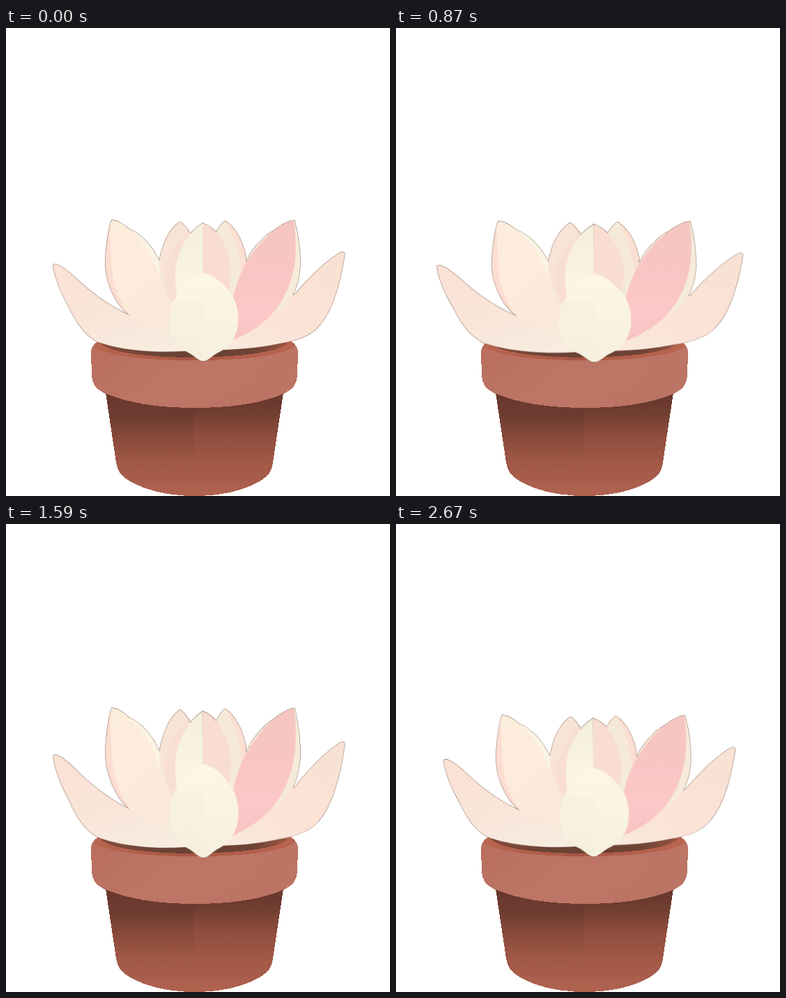
An HTML page without scripts for the animation above (2.7 s loop, 551 px wide and 669 px high).

```html
<!DOCTYPE html>
<html lang="en">
<head>
<meta charset="utf-8">
<title>Potted lotus</title>
<style>
  html, body { margin: 0; width: 100%; height: 100%; overflow: hidden; background: #fff; }
  svg { display: block; width: 551px; height: 669px; }
  .flower { transform-origin: 250px 475px; animation: breathe 2.7s linear infinite; }
  /* widen, settle, stretch upwards, settle */
  @keyframes breathe {
    0%    { transform: translate(0, 0) scale(1, 1); }
    24%   { transform: translate(0, 1.5px) scale(1.0764, 1); }
    47%   { transform: translate(0, 1.6px) scale(1, 1); }
    64.4% { transform: translate(.2px, .5px) scale(1, 1.09); }
    100%  { transform: translate(.8px, -.8px) scale(1, 1); }
  }
</style>
</head>
<body>
<svg viewBox="0 0 551 669" xmlns="http://www.w3.org/2000/svg">
  <defs>
    <linearGradient id="clay" gradientUnits="userSpaceOnUse" x1="0" y1="525" x2="0" y2="669">
      <stop offset="0" stop-color="#6a382d"/>
      <stop offset=".2" stop-color="#6e3b30"/>
      <stop offset=".42" stop-color="#884a3b"/>
      <stop offset=".65" stop-color="#9f5745"/>
      <stop offset="1" stop-color="#b16350"/>
    </linearGradient>
    <linearGradient id="sheen" x2="0" y2="1">
      <stop offset=".1" stop-color="#b0644f" stop-opacity="0"/>
      <stop offset=".45" stop-color="#b0644f" stop-opacity=".2"/>
      <stop offset=".8" stop-color="#b0644f" stop-opacity="0"/>
    </linearGradient>
    <linearGradient id="rim" x2="1" y2=".4">
      <stop offset="0" stop-color="#b96e5d"/>
      <stop offset=".5" stop-color="#bd7565"/>
      <stop offset="1" stop-color="#bc7464"/>
    </linearGradient>
    <linearGradient id="lip">
      <stop offset="0" stop-color="#b9654f"/>
      <stop offset=".45" stop-color="#a95644"/>
      <stop offset="1" stop-color="#b9654f"/>
    </linearGradient>
    <linearGradient id="soil">
      <stop offset="0" stop-color="#8a4a3b"/>
      <stop offset=".3" stop-color="#694335"/>
      <stop offset=".8" stop-color="#6b4234"/>
      <stop offset="1" stop-color="#9d5444"/>
    </linearGradient>
    <linearGradient id="outerLeft" x2=".6" y2="1">
      <stop offset="0" stop-color="#fbe2d5"/>
      <stop offset=".6" stop-color="#f9e6d9"/>
      <stop offset="1" stop-color="#f7ecdf"/>
    </linearGradient>
    <linearGradient id="outerRight" x1="1" x2="0" y2="1">
      <stop offset="0" stop-color="#f7e2d4"/>
      <stop offset=".5" stop-color="#fce3d6"/>
      <stop offset="1" stop-color="#f8eadd"/>
    </linearGradient>
    <linearGradient id="peach" x2=".6" y2="1">
      <stop offset="0" stop-color="#fcecdb"/>
      <stop offset=".4" stop-color="#feecdc"/>
      <stop offset="1" stop-color="#fae8da"/>
    </linearGradient>
    <linearGradient id="rose" x2="0" y2="1">
      <stop offset="0" stop-color="#f5c6c1"/>
      <stop offset=".45" stop-color="#f8c6c4"/>
      <stop offset=".75" stop-color="#fdc9c8"/>
      <stop offset="1" stop-color="#f8c4c3"/>
    </linearGradient>
    <linearGradient id="cream" x2="0" y2="1">
      <stop offset="0" stop-color="#f4efde"/>
      <stop offset="1" stop-color="#fdf7e4"/>
    </linearGradient>
    <linearGradient id="front" x2="0" y2="1">
      <stop offset="0" stop-color="#fdf7e4"/>
      <stop offset="1" stop-color="#f6f1e0"/>
    </linearGradient>

    <g id="petals">
      <path fill="url(#outerLeft)" d="M68 342Q66 336 73 338Q84 342 106 363Q140 394 178 411L245 420L285 459Q255 463 220 462.5Q165 461 130 448Q106 434 90 398Q72 366 68 342Z"/>
      <path fill="url(#outerRight)" d="M486 323Q485 318 478 322Q448 341 415 380L327 430L283 460Q345 461 392 451Q430 445 446 429Q474 402 486 323Z"/>

      <path fill="#faf4e4" d="M152 275Q164 276 176 287Q203 298 220 333L246 395L210 400Z"/>
      <path fill="#fcddd1" d="M152 275Q146 287 143 325Q140 360 160 392Q168 404 180 413L210 400Z"/>
      <path fill="url(#peach)" d="M152 275Q159 274 167 281Q204 306 218 350L246 392L238 436Q205 428 180 413Q156 385 152 345Q150 312 149 284Q150 276 152 275Z"/>

      <path fill="#f6ebdb" d="M414 275Q423 310 422 342Q420 366 411 382Q402 398 384 411L345 385L340 345Q350 318 366 304Q378 290 390 288Q402 276 414 275Z"/>

      <path fill="#f8e4d6" d="M249 277Q255 278 266 297L262 385L236 390Q218 355 220 332Q228 292 249 277Z"/>
      <path fill="#f9ded2" d="M262 290Q232 320 228 350Q229 375 240 392L264 385Z"/>

      <path fill="#fbdfd3" d="M315 276Q336 290 344 326Q346 362 330 390L305 380L298 298Q309 278 315 276Z"/>
      <path fill="#f5ead9" d="M315 276Q308 279 299 296L305 385L329 388Q338 365 337 342Q334 309 315 276Z"/>

      <path fill="url(#cream)" d="M282 279Q249 300 243 345Q242 372 247 390L283 390Z"/>
      <path fill="#f9ddd1" d="M282 279Q296 283 307 299Q323 326 323 348Q323 368 317 388H282Z"/>

      <path fill="url(#rose)" d="M413 275Q417 300 415 330Q410 373 386 404Q362 432 325 446V388Q334 346 358 316Q384 284 408 276Z"/>

      <path fill="url(#front)" d="M283 350Q303 353 323 380Q335 398 333 423C331 443 320 457 304 464C296 468 290 476 283 476C276 476 270 468 262 464C246 457 234 441 234 420Q234 399 243 386Q255 358 283 350Z"/>
      <path fill="#efe6d1" fill-opacity=".2" d="M283 390V476C276 476 270 468 262 464C246 457 234 441 234 420Q234 400 243 387Z"/>
    </g>
  </defs>

  <g class="pot" shape-rendering="crispEdges">
    <path fill="url(#clay)" d="M142.500 518L158 621C160 634 165 640 178 648C202 662 236 669 271 669C306 669 340 662 364 648C377 640 381 634 383 621L398.500 518Z"/>
    <path fill="url(#sheen)" d="M270 540V669C306 669 340 662 364 648C377 640 381 634 383 621L398 518Z"/>
    <path fill="url(#rim)" d="M133 447C125 452 122 457 122 465L123 496C123 509 130 517 143 523C180 538 225 543 270 543C318 543 362 538 398 523C411 517 418 509 418 496L419 465C419 457 416 452 408 447Z"/>
    <path fill="url(#lip)" d="M133 447Q128 451 126 456Q160 475 270 475Q380 475 415 456Q413 450 408 447Z"/>
    <path fill="url(#soil)" d="M135 450Q155 470 270 471Q385 469 405 450Z"/>
  </g>

  <g class="flower">
    <use href="#petals" stroke="#7d5f50" stroke-opacity=".8" stroke-width="1.2"/>
    <use href="#petals"/>
  </g>
</svg>
</body>
</html>
```
